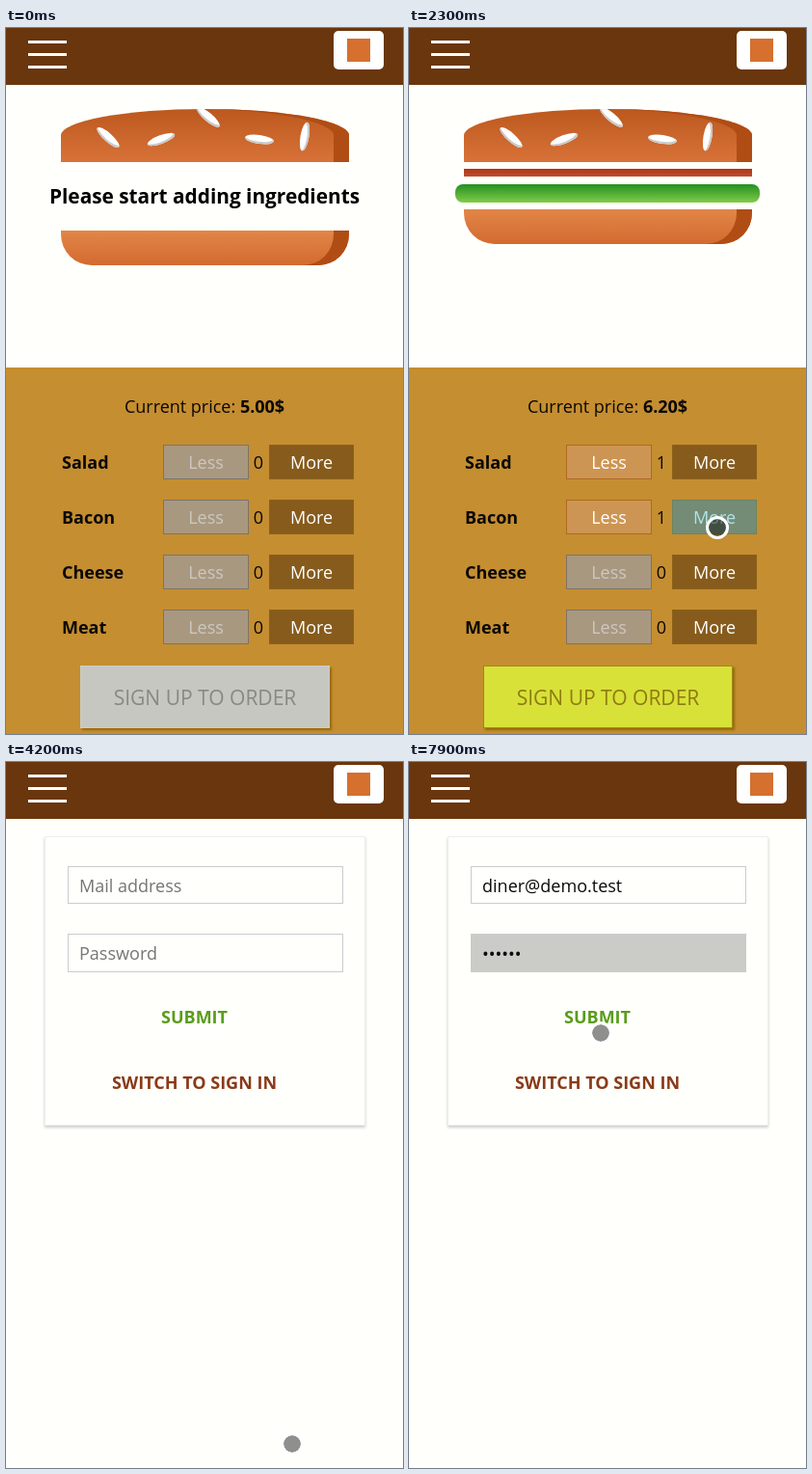
Animation, 412 px wide and 732 px high, one loop 8000 ms. Source, as an HTML page:

```html
<!DOCTYPE html>
<html lang="en">
<head>
<meta charset="utf-8">
<title>Burger order</title>
<style>
* { box-sizing: border-box; }
html, body { margin: 0; width: 100%; height: 100%; overflow: hidden; }
body { background: #fffffc; color: #0a0806; font: 18px "Open Sans", sans-serif; }
#stage { position: relative; width: 412px; height: 732px; overflow: hidden; background: #fffffc; }
#stage div { position: absolute; white-space: pre; }
.mid { text-align: center; }
b { font-weight: 700; }

#head { left: 0; top: 0; width: 412px; height: 59px; background: #6a360d; }
.bar { left: 23px; width: 40px; height: 3px; background: #fff; }
#tile { left: 340px; top: 3px; width: 52px; height: 40px; border-radius: 5px; background: #fff; }
#mark { left: 14px; top: 8px; width: 24px; height: 24px; background: #d5702f; }

.page { left: 0; top: 0; width: 412px; height: 732px; }
#burger { left: 0; top: 84px; width: 412px; display: flex; flex-direction: column; align-items: center; gap: 7.5px; }
#stage #burger > div { position: relative; flex: none; }
.top { width: 299px; height: 54.9px; overflow: hidden; border-radius: 50% 50% 0 0; background: linear-gradient(#bc581e, #d87238); box-shadow: inset -16px 0 #b04d15; }
.bottom { width: 299px; height: 36px; border-radius: 0 0 32px 32px; background: linear-gradient(#e28648, #d36a30); box-shadow: inset -16px 0 #b04d15; }
.seed { width: 30px; height: 9px; margin: -4.5px -15px; border-radius: 50%; background: #fff; box-shadow: inset -1px -2px #c9c9c9; }
.bacon { width: 299px; height: 7.7px; background: linear-gradient(#b23412, #bc5030); }
.cheese { width: 337px; height: 12.4px; border-radius: 7px; background: linear-gradient(#e8cf0c, #d8c41e); }
.meat { width: 299px; height: 21.8px; border-radius: 11px; background: linear-gradient(#74310a, #692b06); }
.salad { width: 316px; height: 19px; border-radius: 8px; background: linear-gradient(#229020, #82cc4a); }
.hint { width: 412px; height: 56px; line-height: 56px; text-align: center; font-size: 20.8px; font-weight: 700; color: #000; }

#panel { left: 0; top: 352px; width: 412px; height: 380px; background: #c58e31; }
#price { left: 0; top: 25px; width: 412px; height: 30px; line-height: 30px; }
.row { left: 0; width: 412px; height: 36px; line-height: 36px; }
.row b { position: absolute; left: 58px; }
.less, .more { top: 0; height: 36px; line-height: 35px; text-align: center; color: #fff; }
.less { left: 163px; width: 89px; background: #cd9553; border: 1px solid #b0691f; }
.less.off { background: #a99880; border-color: #7e7365; color: #ccc8c0; }
.more { left: 273px; width: 88px; background: #865b1c; border: 1px solid #8c6118; }
.more.hover { background: #99703f; }
.tap { inset: -1px; background: rgba(60,182,200,.4); }
.count { left: 252px; width: 20px; text-align: center; }
#order { left: 77px; top: 309px; width: 259px; height: 65px; line-height: 64px; font-size: 21px; text-align: center; background: #d8e138; color: #8f7a10; border: 1px solid #a08a1c; box-shadow: 2px 2px 2px #966909; }
#order.off { background: #c7c7c1; color: #888884; border-color: #ccccc6; }

#form { left: 40px; top: 77px; width: 333px; height: 300px; border: 1px solid #eee; box-shadow: 0 2px 3px #ccc; }
.field { left: 64px; width: 286px; line-height: 39px; padding-left: 11px; border: 1px solid #ccc; color: #0c0c0c; }
#mail { top: 108px; height: 39px; }
#pass { top: 178px; height: 40px; }
.field.empty { color: #757572; }
.field.focus { background: #cbccc7; border-color: #cbccc7; }
.link { left: 0; width: 391px; height: 30px; line-height: 30px; text-align: center; font-weight: 700; }
#dot { left: -12px; top: -12px; width: 24px; height: 24px; border-radius: 50%; border: 3px solid #fff; background: rgba(0,0,0,.44); background-clip: padding-box; }
</style>
</head>
<body>
<div id="stage">
  <div id="head">
    <div class="bar" style="top:13px"></div>
    <div class="bar" style="top:26px"></div>
    <div class="bar" style="top:39px"></div>
    <div id="tile"><div id="mark"></div></div>
  </div>
  <div class="page" id="builder">
    <div id="burger"></div>
    <div id="panel">
      <div id="price" class="mid">Current price: <b></b></div>
      <div id="order">SIGN UP TO ORDER</div>
    </div>
  </div>
  <div class="page" id="signup">
    <div id="form"></div>
    <div class="field" id="mail"></div>
    <div class="field" id="pass"></div>
    <div class="link" style="top:249px;color:#5a9c1c">SUBMIT</div>
    <div class="link" style="top:317px;color:#8a3a18">SWITCH TO SIGN IN</div>
  </div>
  <div id="dot"></div>
</div>
<script>
const LOOP = 8000, SIGNUP = 4150, PASS_FOCUS = 6000, MAIL_FOCUS = 4880;
const MAIL = 'diner@demo.test';
const kinds = ['Salad', 'Bacon', 'Cheese', 'Meat'];
const cost = [0.5, 0.7, 0.7, 1.2];
const stack = [1, 2, 3, 0];
// [time, row] of each press on "More"
const taps = [[1717, 0], [2300, 1], [2790, 2], [3200, 2], [3580, 3]];
// [time, x, y] stops of the pointer
const path = [
  [250, 430, 425], [1250, 317, 465], [1900, 317, 465], [2200, 320, 518], [2420, 320, 518],
  [2700, 325, 577], [3300, 325, 577], [3520, 328, 646], [3820, 328, 646], [4060, 297, 707],
  [4260, 297, 707], [4820, 190, 138], [5640, 190, 138], [5880, 205, 204], [7520, 205, 204],
  [7860, 199, 281], [8000, 199, 281]
];
// x, y, angle inside the top bun
const seeds = [[49, 29, 42], [104, 31, -20], [153, 8, 40], [206, 31, 8], [253, 28, -80]];

const $ = id => document.getElementById(id);
const clamp = v => Math.min(1, Math.max(0, v));

function add(parent, cls, text = '') {
  const el = document.createElement('div');
  el.className = cls;
  el.textContent = text;
  parent.append(el);
  return el;
}

const rows = kinds.map((name, i) => {
  const row = add($('panel'), 'row');
  row.style.top = 80 + 57 * i + 'px';
  row.innerHTML = `<b>${name}</b>`;
  const less = add(row, 'less', 'Less');
  const count = add(row, 'count');
  const more = add(row, 'more', 'More');
  return { less, count, more, tap: add(more, 'tap') };
});

let shown = '';
function drawBurger(counts) {
  const key = counts.join();
  if (key === shown) return;
  shown = key;
  const burger = $('burger');
  burger.textContent = '';
  const bun = add(burger, 'top');
  for (const [x, y, a] of seeds)
    add(bun, 'seed').style.cssText = `left:${x}px;top:${y}px;transform:rotate(${a}deg)`;
  for (const k of stack)
    for (let n = 0; n < counts[k]; n++) add(burger, kinds[k].toLowerCase());
  if (!counts.some(Boolean)) add(burger, 'hint', 'Please start adding ingredients');
  add(burger, 'bottom');
}

function drawBuilder(t) {
  const done = taps.filter(p => p[0] <= t);
  const counts = kinds.map((_, i) => done.filter(p => p[1] === i).length);
  const sum = counts.reduce((s, n, i) => s + n * cost[i], 5);
  const last = done.length ? done[done.length - 1][1] : -1;
  drawBurger(counts);
  $('price').lastChild.textContent = sum.toFixed(2) + '$';
  rows.forEach((r, i) => {
    r.less.classList.toggle('off', !counts[i]);
    r.count.textContent = counts[i];
    r.more.classList.toggle('hover', i === last);
    const lit = taps.some(p => p[1] === i && t > p[0] - 80 && t < p[0] + 130);
    r.tap.style.display = lit ? '' : 'none';
  });
  const p = clamp((t - taps[0][0]) / 300);
  const grow = p < 0.6 ? p / 0.6 : (1 - p) / 0.4;
  $('order').classList.toggle('off', !done.length);
  $('order').style.transform = `scale(${1 + 0.1 * grow})`;
}

function setField(el, text, hint, focus) {
  el.textContent = text || hint;
  el.classList.toggle('empty', !text);
  el.classList.toggle('focus', focus);
}

function drawSignup(t) {
  const typed = Math.round(clamp((t - 4980) / 640) * MAIL.length);
  const dots = Math.floor(clamp((t - 6250) / 1100) * 6);
  setField($('mail'), MAIL.slice(0, typed), 'Mail address', t >= MAIL_FOCUS && t < PASS_FOCUS);
  setField($('pass'), '•'.repeat(dots), 'Password', t >= PASS_FOCUS);
}

function drawPointer(t) {
  let i = 0;
  while (i < path.length - 2 && t >= path[i + 1][0]) i++;
  const [t0, x0, y0] = path[i], [t1, x1, y1] = path[i + 1];
  const p = clamp((t - t0) / (t1 - t0));
  const e = p * p * (3 - 2 * p);
  $('dot').style.transform = `translate(${x0 + (x1 - x0) * e}px,${y0 + (y1 - y0) * e}px)`;
}

let start;
function frame() {
  const now = performance.now();
  start ??= now;
  const t = (now - start) % LOOP;
  const building = t < SIGNUP;
  $('builder').style.display = building ? '' : 'none';
  $('signup').style.display = building ? 'none' : '';
  if (building) drawBuilder(t);
  else drawSignup(t);
  drawPointer(t);
  requestAnimationFrame(frame);
}
frame();
</script>
</body>
</html>
```
